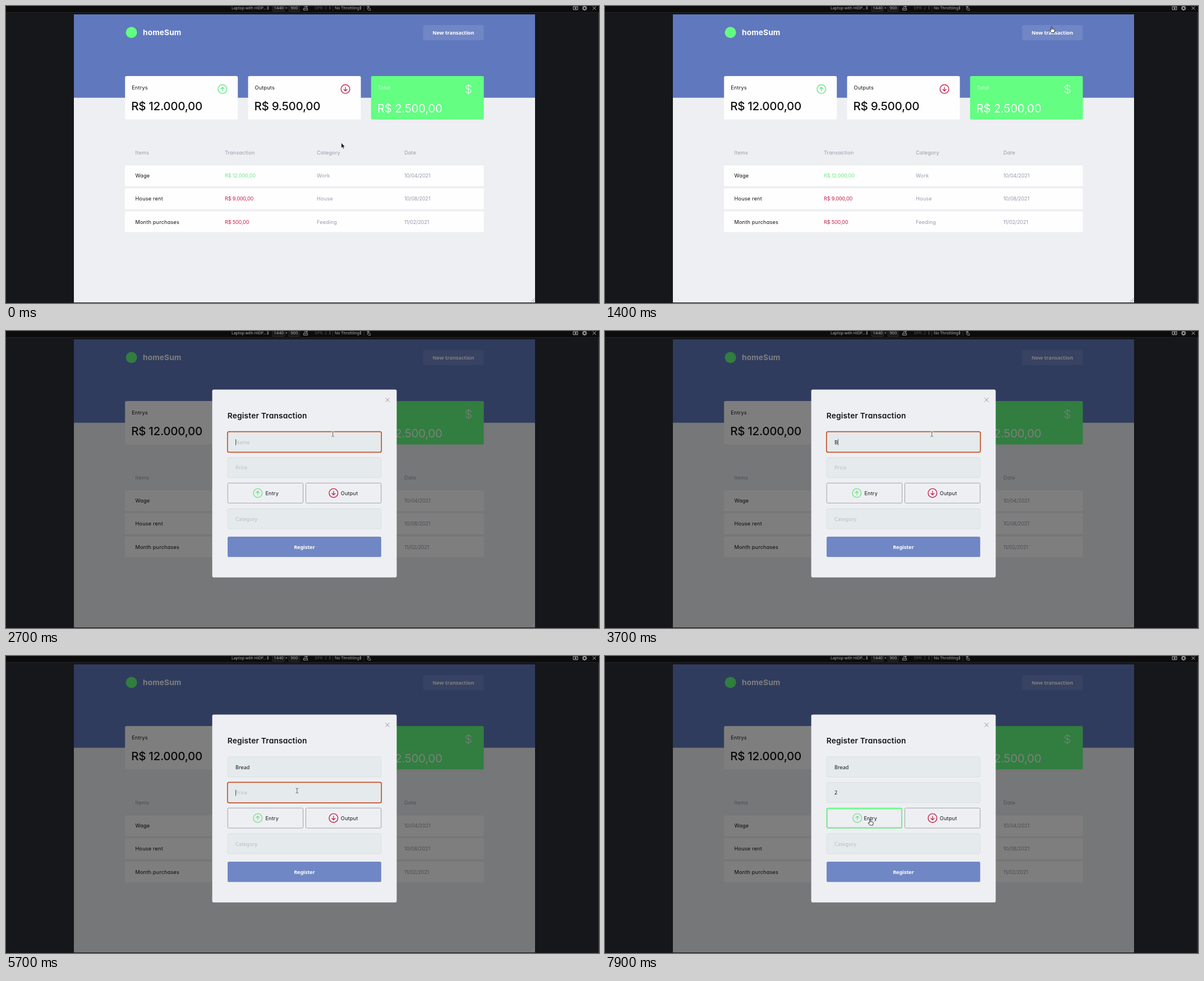
An HTML page that plays this animation: 1057 px wide and 530 px high, repeating every 8 s.

```html
<!DOCTYPE html>
<html lang="en">
<head>
<meta charset="utf-8">
<title>Finance dashboard</title>
<style>
  html, body { margin: 0; width: 100%; height: 100%; overflow: hidden; background: #16171a; }
  svg { display: block; width: 1057px; height: 530px; }
  text { font: 400 9.14px Inter, sans-serif; font-feature-settings: "cv11"; font-optical-sizing: none;
         letter-spacing: .022em; fill: #111214; white-space: pre; }
  .num { letter-spacing: -.02em; }
  .big { font-size: 20.57px; letter-spacing: -.015em; }
  .medium { font-weight: 500; }
  .brand { font-size: 13.7px; font-weight: 700; letter-spacing: .01em; }
  .title { font-size: 13.7px; font-weight: 600; letter-spacing: .015em; }
  .ui { font-family: "Noto Sans", "Open Sans", sans-serif; letter-spacing: 0; }
  .button { font-weight: 600; letter-spacing: -.01em; text-anchor: middle; }
  .bar { font-size: 7px; }
  .size { font-size: 7.7px; }
  .line { fill: none; stroke-linecap: round; stroke-linejoin: round; }
</style>
</head>
<body>
<svg id="stage" viewBox="0 0 1057 530"></svg>
<script>
const LOOP = 8000;
const GREEN = '#63fe82', RED = '#c4204d', GREY = '#969bae', INK = '#111214', WHITE = '#fffefe';

const rect = (x, y, w, h, fill, r = 0, extra = '') =>
  `<rect x="${x}" y="${y}" width="${w}" height="${h}" rx="${r}" fill="${fill}" ${extra}/>`;
const text = (x, y, str, cls = '', fill = INK, id = '') =>
  `<text x="${x}" y="${y}" class="${cls}" style="fill:${fill}" ${id && `id="${id}"`}>${str}</text>`;
const line = (d, color, width = 1, extra = '') =>
  `<path class="line" d="${d}" stroke="${color}" stroke-width="${width}" ${extra}/>`;
const group = (id, body, x = 0, y = 0) =>
  `<g id="${id}" transform="translate(${x} ${y})">${body}</g>`;

const arrowIcon = (x, y, color, turn = 0) =>
  `<g transform="translate(${x} ${y}) rotate(${turn})">
    <circle r="7.8" fill="none" stroke="${color}" stroke-width="1.4"/>
    ${line('M0 3.3V-3.3M-2.9-.5L0-3.4 2.9-.5', color, 1.3)}</g>`;
const dollarIcon = (x, y) =>
  `<g transform="translate(${x} ${y})">
    ${line('M0-8.8V8.8M4.5-4C4.5-5.8 2.6-6.7 0-6.7S-4.6-5.6-4.6-3.4-2.6-.5 0 0 4.7 1.2 4.7 3.4 2.6 6.7 0 6.7-4.7 5.6-4.7 3.6',
      WHITE, 1.1)}</g>`;

function toolbar() {
  const tone = '#b4b4b7', dim = '#56565a', edge = '#37373b';
  const spin = x => `<path d="M${x} 2.8l1.8-2.3 1.8 2.3zM${x} 4.2l1.8 2.3 1.8-2.3z" fill="${tone}"/>`;
  const field = (x, w) => rect(x, -3, w, 12.5, '#18181a', 1, `stroke="${edge}" stroke-width=".8"`);
  const teeth = Array.from({ length: 8 }, (_, i) =>
    `<path d="M0-2.6V-4.4" stroke="${tone}" stroke-width="1.4" transform="rotate(${i * 45})"/>`).join('');
  return rect(0, 0, 1057, 11.5, '#0c0c0d') + rect(0, 11.2, 1057, .8, '#29292c') +
    text(402, 6, 'Laptop with HiDP…', 'ui bar', tone) + spin(465) +
    field(475, 21.5) + text(477.4, 6.4, '1440', 'ui size', tone) + text(497.8, 6, '×', 'ui bar', tone) +
    field(504, 19) + text(507.2, 6.4, '900', 'ui size', tone) +
    line('M530.8 4.3h6.6v3h-6.6zM531.5 2.6c.5-2.4 4-2.8 5-.6M536.8-.4v2.4h-2.2', tone, .9) +
    text(550.5, 6, 'DPR: 2', 'ui bar', dim) +
    `<path d="M575.5 2.8l1.8-2.3 1.8 2.3zM575.5 4.2l1.8 2.3 1.8-2.3z" fill="${dim}"/>` +
    rect(582, 0, .8, 9, edge) + text(586, 6, 'No Throttling', 'ui bar', tone) + spin(630) +
    rect(637.5, 0, .8, 9, edge) +
    line('M645 5V1.2c0-1 1.3-1 1.3 0v2.5l2.8.8c.7.3.7 1 .4 3h-3.4l-2.2-2.6', tone, .8) +
    line('M643.3 1.8c.5-2.4 4.2-2.4 4.7 0', tone, .7) +
    line('M1011.5 1h7.6v5.6h-7.6z', tone, 1) + `<circle cx="1015.3" cy="3.8" r="1.5" fill="${tone}"/>` +
    `<g transform="translate(1031.3 3.8)">${teeth}<circle r="2.5" fill="none" stroke="${tone}" stroke-width="1.2"/></g>` +
    line('M1046 1.2l5.2 5.2M1051.2 1.2L1046 6.4', tone, 1);
}

function card(x, title, value, icon, total) {
  return rect(x, 125, 201, 77.5, total ? GREEN : WHITE, 2.6) +
    text(x + 12, 149.4, title, '', total ? '#d5ffdd' : INK) + icon +
    text(x + 11, total ? 189.5 : 186, value, total ? 'big' : 'big medium', total ? WHITE : INK);
}

function page() {
  const cols = [230.5, 390, 554, 710];
  const rows = [
    ['Wage', 'R$ 12.000,00', 'Work', '10/04/2021', GREEN],
    ['House rent', 'R$ 9.000,00', 'House', '10/08/2021', RED],
    ['Month purchases', 'R$ 500,00', 'Feeding', '11/02/2021', RED],
  ];
  const head = ['Items', 'Transaction', 'Category', 'Date'].map((s, i) => text(cols[i], 265.4, s, '', GREY)).join('');
  const body = rows.map((row, r) => {
    const tones = [INK, row[4] === GREEN ? '#6be888' : row[4], GREY, GREY];
    return rect(212, 284.5 + r * 41.1, 639.7, 36.8, WHITE, 1.5) +
      cols.map((x, i) => text(x, 306.3 + r * 41.1, row[i], i % 2 ? 'num' : '', tones[i])).join('');
  }).join('');
  return rect(121, 15, 822, 514, '#eeeff2') + rect(121, 15, 822, 148.7, '#6078be') +
    `<circle cx="223.6" cy="47.3" r="10" fill="${GREEN}"/>` + text(244, 51.6, 'homeSum', 'brand', WHITE) +
    rect(743.5, 34, 108, 27, '#7086c5', 2.6) + text(797.3, 50.7, 'New transaction', 'ui button', WHITE) +
    card(212.2, 'Entrys', 'R$ 12.000,00', arrowIcon(385.8, 148.3, '#5fe783')) +
    card(431.5, 'Outputs', 'R$ 9.500,00', arrowIcon(605, 148.3, RED, 180)) +
    card(650.7, 'Total', 'R$ 2.500,00', dollarIcon(824.3, 148.3), true) + head + body;
}

const input = (y, id, hint) =>
  rect(395.2, y, 273.4, 36, '#e5eaec', 2.6, 'stroke="#d5dadd" stroke-width=".7"') +
  text(409, y + 21.6, hint, 'ui', '#b8bec3', id + 'Hint') + text(409, y + 21.6, '', 'ui', INK, id + 'Text');

function modal() {
  const choice = x => rect(x, 271.3, 134.3, 35.8, 'none', 2, 'stroke="#999ba3" stroke-width=".9"');
  return rect(121, 15, 822, 514, '#000', 0, 'opacity=".5"') +
    rect(367.6, 104.4, 328.8, 335.4, '#eeeff2', 2.8) +
    line('M676.8 119.6l6.6 6.6M683.4 119.6l-6.6 6.6', '#92959f', 1) +
    text(394.8, 156.2, 'Register Transaction', 'title') +
    input(180, 'name', 'Name') + input(225.7, 'price', 'Price') + input(317, 'category', 'Category') +
    choice(395.2) + choice(534.4) +
    group('picked', rect(395.9, 272, 133, 34.5, 'none', 1.6, `stroke="${GREEN}" stroke-width="2"`)) +
    group('entryIcon', arrowIcon(448.8, 289.2, '#6fe68c')) + group('entryLabel', text(462.4, 292.5, 'Entry')) +
    arrowIcon(583.8, 289.2, RED, 180) + text(596.8, 292.5, 'Output') +
    rect(395, 367, 273.8, 36.3, '#7087c5', 2.6) + text(531.8, 388.5, 'Register', 'ui button', WHITE) +
    group('focus', rect(394.8, 179.6, 274.4, 36.8, 'none', 3, 'stroke="#c6532f" stroke-width="1.7"')) +
    group('caret', rect(0, 193, .8, 11, '#333'));
}

const pointers =
  group('arrow', `<path d="M0 0V9.7L2.2 7.7 3.7 11.1 5.3 10.4 3.9 7.2H6.8Z" fill="#101010" stroke="#fff" stroke-width=".7"/>`) +
  group('hand', `<path d="M-.9 6.8V.8C-.9-.4.9-.4.9.8V4L4.6 4.8C5.5 5 5.7 5.6 5.6 6.5L4.9 10.6H-.2L-3.3 7C-3.7 5.9-2.6 5.4-1.9 6Z"
    fill="#fff" stroke="#151515" stroke-width=".9" stroke-linejoin="round"/>`) +
  group('beam', line('M0-3.6V3.6M-2-4.4Q-.3-4.4 0-3.4 .3-4.4 2-4.4M-2 4.4Q-.3 4.4 0 3.4 .3 4.4 2 4.4', '#fff', 1.8) +
    line('M0-3.6V3.6M-2-4.4Q-.3-4.4 0-3.4 .3-4.4 2-4.4M-2 4.4Q-.3 4.4 0 3.4 .3 4.4 2 4.4', '#444', .9));

const stage = document.getElementById('stage');
stage.innerHTML = rect(0, 0, 1057, 530, '#16171a') + toolbar() + rect(1055.6, 12, 1.4, 518, '#303033') +
  page() + group('modal', modal()) +
  line('M936.5 527.5l5.5-5.5M939.5 527.5l2.5-2.5', '#8b8c8f', .8) + pointers;

const el = Object.fromEntries([...stage.querySelectorAll('[id]')].map(n => [n.id, n]));

// Each track holds [start, value...] and keeps its value until the next start.
const pointerTrack = [
  [0, 'arrow', 597.6, 244], [700, 'arrow', 645, 184], [800, 'arrow', 698.6, 114],
  [1100, 'arrow', 758, 66], [1200, 'hand', 796, 36.8], [1600, 'arrow', 794.6, 37.4],
  [1900, 'arrow', 842, 62], [2000, 'arrow', 879.5, 84], [2200, 'arrow', 761, 184.5],
  [2400, 'arrow', 688, 186], [2500, 'beam', 622, 185], [2600, 'beam', 582.6, 184],
  [5300, 'beam', 568, 198], [5400, 'beam', 538, 231], [5500, 'beam', 518.8, 240.3],
  [7400, 'beam', 505, 252], [7500, 'arrow', 489, 268], [7600, 'hand', 476, 284], [7700, 'hand', 472.6, 291.4],
];
const nameTrack = [[0, ''], [3500, 'B'], [4300, 'Br'], [4400, 'Bre'], [4600, 'Brea'], [4800, 'Bread']];
const priceTrack = [[0, ''], [6600, '2']];
const focusTrack = [[0, ''], [2700, 'name'], [5700, 'price'], [7700, '']];
const caretTrack = [[0, true], [5100, false], [5500, true]];

const at = (track, t) => track.findLast(step => step[0] <= t).slice(1);
const show = (node, on) => node.setAttribute('visibility', on ? 'visible' : 'hidden');
const move = (node, x, y) => node.setAttribute('transform', `translate(${x} ${y})`);

function fill(id, value) {
  el[id + 'Text'].textContent = value;
  show(el[id + 'Hint'], !value && el.modal.getAttribute('display') !== 'none');
}

function draw(t) {
  const [kind, x, y] = at(pointerTrack, t);
  for (const id of ['arrow', 'hand', 'beam']) show(el[id], id === kind);
  move(el[kind], x, y);

  el.modal.setAttribute('display', t >= 1600 ? 'inline' : 'none');
  fill('name', at(nameTrack, t)[0]);
  fill('price', at(priceTrack, t)[0]);

  const [active] = at(focusTrack, t);
  show(el.focus, active);
  show(el.caret, active && at(caretTrack, t)[0]);
  if (active) {
    const down = active === 'price' ? 45.7 : 0;
    const value = el[active + 'Text'];
    move(el.focus, 0, down);
    move(el.caret, 409 + (value.textContent ? value.getComputedTextLength() : 0), down);
  }

  const picked = t >= 7900;
  show(el.picked, picked);
  move(el.entryIcon, picked ? 1 : 0, 0);
  move(el.entryLabel, picked ? -1 : 0, 0);
}

const start = performance.now();
function tick() {
  draw((performance.now() - start) % LOOP);
  requestAnimationFrame(tick);
}
tick();
</script>
</body>
</html>
```
